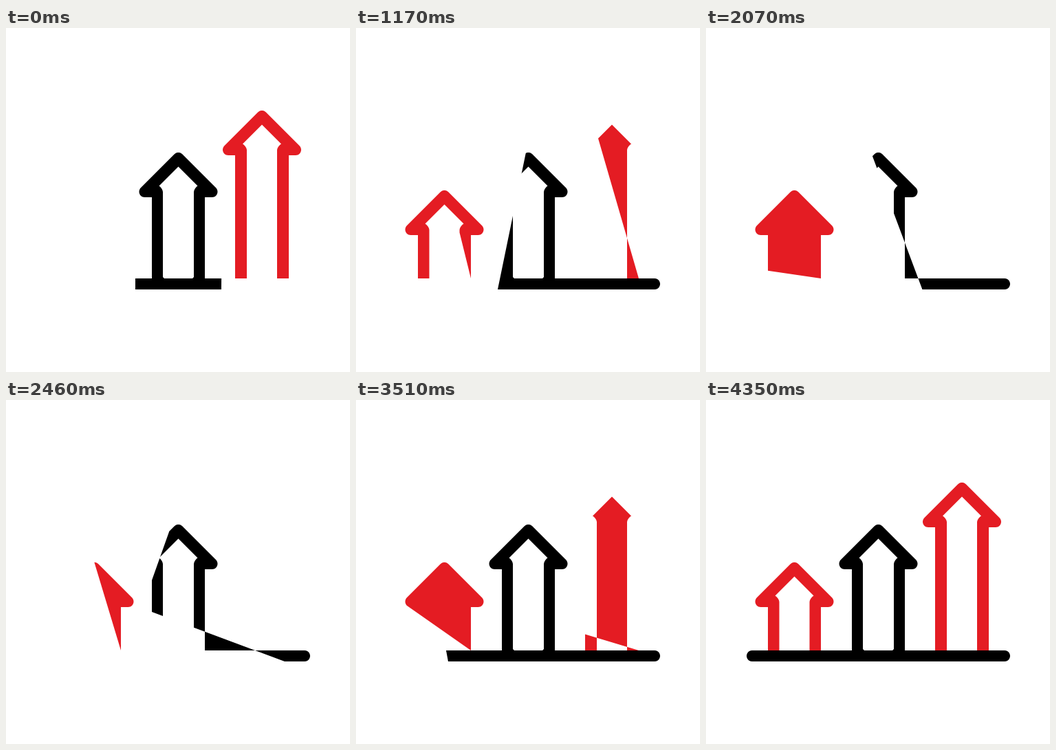
An HTML page with a canvas for the animation above (5130 ms loop, 500 by 500 pixels).

```html
<!DOCTYPE html>
<html lang="en">
<head>
<meta charset="utf-8">
<title>Rising arrows</title>
<style>
  html, body { margin: 0; width: 100%; height: 100%; overflow: hidden; background: #fff; }
  canvas { display: block; width: 500px; height: 500px; }
</style>
</head>
<body>
<canvas id="stage" width="500" height="500"></canvas>
<script>
const ctx = document.getElementById('stage').getContext('2d');
const LOOP = 5130, STEP = 30;
const RED = '#e41c23', BLACK = '#000', WHITE = '#fff';
const BASE = 364, R = 8, ROOF = 49;

// Piecewise linear value from [time, value] knots.
function track(knots, t) {
  if (t <= knots[0][0]) return knots[0][1];
  for (let i = 1; i < knots.length; i++) {
    const [t0, v0] = knots[i - 1], [t1, v1] = knots[i];
    if (t <= t1) return v0 + (v1 - v0) * (t - t0) / (t1 - t0);
  }
  return knots[knots.length - 1][1];
}

function arc(cx, cy, from, to, n = 12) {
  const pts = [];
  for (let i = 0; i <= n; i++) {
    const a = (from + (to - from) * i / n) * Math.PI / 180;
    pts.push([cx + R * Math.cos(a), cy + R * Math.sin(a)]);
  }
  return pts;
}

const mirror = (pts, cx) => pts.map(([x, y]) => [2 * cx - x, y]).reverse();

// Right half of the outer edge, from the leg's foot up to the tip.
function outerHalf(cx, top, half) {
  const y = top + R;
  return [
    [cx + half, BASE], [cx + half, y + ROOF + R],
    ...arc(cx + ROOF, y + ROOF, 90, -45),
    ...arc(cx, y, -45, -90, 6)
  ];
}

// Left half of the inner edge, from the foot up to the inner tip.
function innerHalf(cx, top, half) {
  const y = top + 20.5, pts = [[cx - half, BASE]];
  for (let i = 0; i <= 6; i++) {
    const k = i / 6, m = 1 - k;
    pts.push([
      cx - half * m * m - 2 * (half + 0.5) * m * k - 28 * k * k,
      y + 37 * m * m + 2 * 32 * m * k + 28 * k * k
    ]);
  }
  pts.push([cx, y]);
  return pts;
}

function arrow(cx, top, half, inner) {
  const out = outerHalf(cx, top, half), inn = innerHalf(cx, top, inner);
  return measure([...out, ...mirror(out, cx), ...inn, ...mirror(inn, cx), out[0]]);
}

function measure(pts) {
  const at = [0];
  for (let i = 1; i < pts.length; i++) {
    at.push(at[i - 1] + Math.hypot(pts[i][0] - pts[i - 1][0], pts[i][1] - pts[i - 1][1]));
  }
  return { pts, at, len: at[at.length - 1] };
}

function slice({ pts, at, len }, from, to) {
  from = Math.max(0, from);
  to = Math.min(len, to);
  if (to - from < 0.01) return [];
  const point = d => {
    let i = 1;
    while (i < at.length - 1 && at[i] < d) i++;
    const k = (d - at[i - 1]) / (at[i] - at[i - 1] || 1);
    return [0, 1].map(c => pts[i - 1][c] + (pts[i][c] - pts[i - 1][c]) * k);
  };
  return [point(from), ...pts.filter((_, i) => at[i] > from && at[i] < to), point(to)];
}

function fill(pts, color) {
  if (pts.length < 3) return;
  ctx.fillStyle = color;
  ctx.beginPath();
  pts.forEach(([x, y]) => ctx.lineTo(x, y));
  ctx.closePath();
  ctx.fill();
}

const small = arrow(128.5, 236, 38.5, 22);
const tall = arrow(372, 120, 39, 22);

const MID = 250.5, MID_TOP = 181;
const side = outerHalf(MID, MID_TOP, 38.5);
const middle = measure([
  ...side.slice().reverse(),
  ...arc(434, BASE + R, -90, 90),
  ...arc(67, BASE + R, 90, 270),
  ...mirror(side, MID).reverse()
]);
const holeSide = innerHalf(MID, MID_TOP, 22.5);
holeSide.splice(0, 1, [MID - 20.5, BASE], [MID - 22.5, BASE - 2]);
const hole = [...holeSide, ...mirror(holeSide, MID)];

const smallEnd = [[0, 0], [570, 256], [1170, 528], [1355, small.len], [1620, 505],
  [2460, 168], [2880, 0], [3510, 256], [4320, small.len - 24.5], [4350, small.len]];
const tallKept = [[0, tall.len], [1587, 0], [2713, 0], [3510, 532], [3780, 733], [4320, tall.len]];

// Edges of the visible stretches of the middle outline, measured from its tip.
const headEnd = [[0, 247], [570, 451], [1170, 621], [1355, 675], [1620, 617],
  [2460, 422], [2560, 402], [3510, 693], [4320, 772.5]];
const floorStart = [[0, 514], [330, 639]];
const legStart = [[0, 906], [570, 982], [700, 1004], [2250, 1010], [2460, 986],
  [3510, 849], [4320, 772.5]];
const legEnd = [[0, 1136], [250, 1136], [570, 1047], [700, 1000], [2250, 1005],
  [2460, 1032], [2850, 1136]];
const tailStart = [[0, 1136], [570, 1136], [1170, 1149], [1355, 1152], [1620, 1150],
  [2460, 1136]];

function drawMiddle(t) {
  const cut = (from, to) => slice(middle, from, to);
  fill([
    ...cut(0, track(headEnd, t)),
    ...(t < 330 ? cut(track(floorStart, t), 639) : []),
    ...cut(track(legStart, t), track(legEnd, t)),
    ...cut(track(tailStart, t), middle.len)
  ], BLACK);
  fill(hole, WHITE);
}

function draw(t) {
  ctx.fillStyle = WHITE;
  ctx.fillRect(0, 0, 500, 500);
  drawMiddle(t);
  fill(slice(small, 0, track(smallEnd, t)), RED);
  fill(slice(tall, tall.len - track(tallKept, t), tall.len), RED);
}

const start = performance.now();
function tick() {
  const t = (performance.now() - start) % LOOP;
  draw(Math.floor(t / STEP) * STEP);
  requestAnimationFrame(tick);
}
tick();
</script>
</body>
</html>
```
